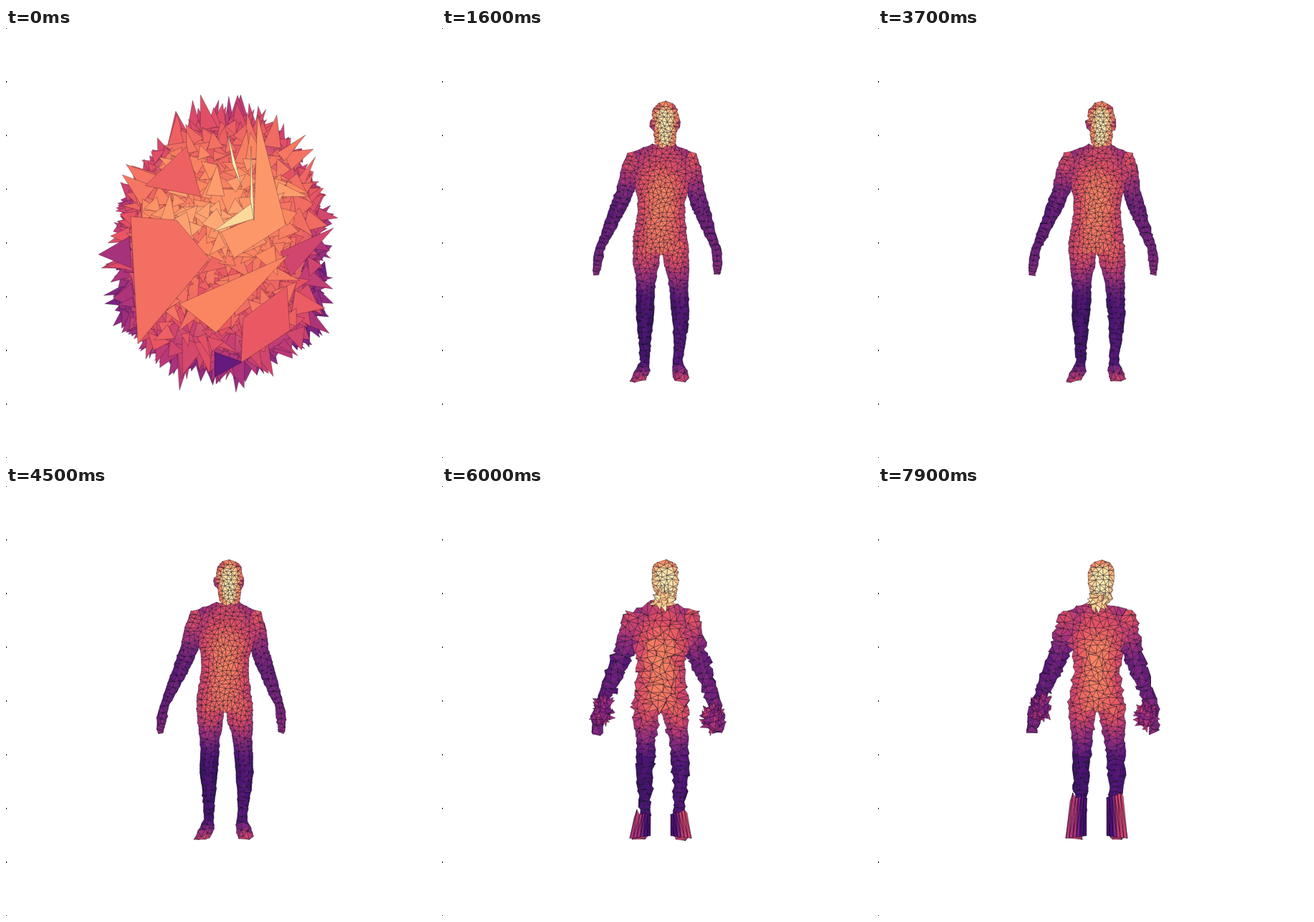
These frames come from a looping animation (600x600 px, 8 s). An HTML page with a canvas:

```html
<!DOCTYPE html>
<html lang="en">
<head>
<meta charset="utf-8">
<title>Mesh figure</title>
<style>
html, body { margin: 0; width: 100%; height: 100%; overflow: hidden; background: #fff; }
canvas { display: block; width: 600px; height: 600px; }
</style>
</head>
<body>
<canvas id="stage" width="600" height="600"></canvas>
<script>
const ctx = document.getElementById('stage').getContext('2d');
const LOOP = 8000, STEP = 100, COARSE_FROM = 4600;

// ---------- helpers ----------
const clamp = (v, lo = 0, hi = 1) => Math.min(hi, Math.max(lo, v));
const mix = (a, b, k) => a + (b - a) * k;
const ramp = (a, b, v) => { const k = clamp((v - a) / (b - a)); return k * k * (3 - 2 * k); };
const hash = n => { const s = Math.sin(n * 12.9898 + 4.1) * 43758.5453; return s - Math.floor(s); };
const signed = n => hash(n) * 2 - 1;

function drift(seed, s) {
  const i = Math.floor(s);
  return mix(signed(seed + i * 7.13), signed(seed + (i + 1) * 7.13), ramp(0, 1, s - i));
}

// Linear interpolation between key rows [y, ...values]; null outside them.
function between(keys, y) {
  const i = keys.findIndex((row, j) => j && y >= keys[j - 1][0] && y <= row[0]);
  if (i < 0) return null;
  const a = keys[i - 1], b = keys[i], k = (y - a[0]) / (b[0] - a[0]);
  return a.slice(1).map((v, j) => mix(v, b[j + 1], k));
}

const MAGMA = ['000004', '1d1147', '51127c', '822681', 'b73779', 'e75263', 'fc8961', 'fec488', 'fcfdbf']
  .map(h => [0, 2, 4].map(i => parseInt(h.slice(i, i + 2), 16)));

function color(v) {
  const p = clamp(v, 0, 0.9999) * 8, i = Math.floor(p);
  return `rgb(${MAGMA[i].map((c, j) => Math.round(mix(c, MAGMA[i + 1][j], p - i)))})`;
}

// ---------- body: key rows of y, (offset from the axis,) half width ----------
const TORSO = [[162, 14], [172, 38], [183, 50], [205, 43], [238, 33], [262, 33], [295, 38], [314, 38]];
const ARM = [[175, 42, 6], [195, 44, 11.5], [225, 48, 13], [250, 57, 12], [290, 73, 8], [308, 81, 6], [322, 83, 7], [345, 84.5, 4]];
const LEG = [[300, 19.5, 19.5], [330, 21, 17.5], [352, 22.5, 13.5], [400, 25, 12], [440, 24.2, 8], [466, 23, 6.5], [480, 26, 11], [494, 32, 10]];

const armAxis = y => 306.5 - (y - 180) * .04;
const legAxis = y => 304.5 + 3.5 * Math.sin(Math.PI * (y - 300) / 195);

function limb(keys, axis, side, tone, pad = 0) {
  return {
    from: keys[0][0], to: keys[keys.length - 1][0], drop: .1, power: 2, tone: y => tone(y) + side * .015,
    span: y => { const r = between(keys, y); return r && [axis(y) + side * r[0], r[1] + pad]; }
  };
}

function dome(cx, y0, y1, radius, neck, drop, power, tone) {
  const brow = y0 + radius;
  return {
    from: y0, to: y1, drop, power, tone,
    span: y => y < y0 || y > y1 ? null
      : [cx, y < brow ? Math.sqrt(radius ** 2 - (brow - y) ** 2) : mix(radius, neck, ramp(brow + 5, y1, y))]
  };
}

const armTone = y => .35 + .27 * (1 - ramp(178, 250, y)) + .06 * ramp(290, 345, y);
const legTone = y => .26 + .38 * (1 - ramp(308, 392, y)) + .32 * ramp(462, 494, y);
const torsoTone = y => .59 + .14 * ramp(172, 230, y) - .03 * ramp(250, 314, y);
const headTone = y => .76 + .2 * ramp(103, 122, y) - .1 * ramp(155, 166, y);

function figure(rough) {
  const parts = [
    dome(311.5, 103, 166, 18, 13.5, rough ? .2 : .3, rough ? 4 : 2, headTone),
    { from: 162, to: 314, drop: .19, power: 2, tone: torsoTone,
      span: y => { const r = between(TORSO, y); return r && [mix(308, 304.5, ramp(162, 314, y)), r[0]]; } }];
  for (const side of [-1, 1]) {
    parts.push(limb(ARM, armAxis, side, armTone, rough ? 2 : 0), limb(LEG, legAxis, side, legTone));
    if (!rough) parts.push(dome(311 + side * 17, 126, 142, 4, 2, .1, 2, () => .52));
  }
  return parts;
}

// Brightness at a point, or -1 outside the figure.
function toneAt(parts, x, y, inset = 0) {
  let best = -1;
  for (const p of parts) {
    const s = p.span(y);
    if (!s || Math.abs(x - s[0]) > s[1] - inset) continue;
    best = Math.max(best, p.tone(y) - p.drop * Math.abs((x - s[0]) / s[1]) ** p.power);
  }
  return best;
}

// ---------- mesh ----------
function scatter(parts, gap) {
  const pts = [];
  const add = (x, y, r) => {
    if (pts.every(p => (p.x - x) ** 2 + (p.y - y) ** 2 >= r * r)) pts.push({ x, y });
  };
  const rim = (x, y) => {
    if (toneAt(parts, x, y, 1) < 0) add(x + signed(x + y) * .3, y + signed(x * 3 + y) * .3, gap * .5);
  };
  for (const p of parts) {
    for (let y = p.from; y <= p.to; y += gap * .5) {
      const [c, w] = p.span(y);
      rim(c - w, y);
      rim(c + w, y);
    }
    for (const y of [p.from, p.to]) {
      const [c, w] = p.span(y);
      for (let x = c - w; x <= c + w; x += gap * .7) rim(x, y);
    }
  }
  for (let i = 0; i < 22000; i++) {
    const x = 210 + hash(i * 2 + .3) * 180, y = 103 + hash(i * 2 + 1.7) * 393;
    if (toneAt(parts, x, y, 1.2) >= 0) add(x, y, gap * (y < 166 ? .8 : 1));
  }
  return pts;
}

// Bowyer-Watson Delaunay triangulation.
function triangulate(pts) {
  const all = [...pts, { x: -3000, y: -2000 }, { x: 3600, y: -2000 }, { x: 300, y: 5000 }];
  const n = pts.length;
  const circle = v => {
    const [a, b, c] = v.map(i => all[i]);
    const bx = b.x - a.x, by = b.y - a.y, cx = c.x - a.x, cy = c.y - a.y;
    const d = 2 * (bx * cy - by * cx) || 1e-9, bb = bx * bx + by * by, cc = cx * cx + cy * cy;
    const ux = (cy * bb - by * cc) / d, uy = (bx * cc - cx * bb) / d;
    return { v, x: a.x + ux, y: a.y + uy, rr: ux * ux + uy * uy };
  };
  let tris = [circle([n, n + 1, n + 2])];
  pts.forEach((p, i) => {
    const edges = new Map(), keep = [];
    for (const t of tris) {
      if ((p.x - t.x) ** 2 + (p.y - t.y) ** 2 > t.rr) { keep.push(t); continue; }
      for (let j = 0; j < 3; j++) {
        const a = t.v[j], b = t.v[(j + 1) % 3], key = Math.min(a, b) * 10000 + Math.max(a, b);
        if (!edges.delete(key)) edges.set(key, [a, b]);
      }
    }
    for (const [a, b] of edges.values()) keep.push(circle([a, b, i]));
    tris = keep;
  });
  return tris.map(t => t.v).filter(v => Math.max(...v) < n);
}

function buildMesh(parts, gap) {
  const pts = scatter(parts, gap), faces = [];
  for (const v of triangulate(pts)) {
    const x = v.reduce((s, i) => s + pts[i].x, 0) / 3, y = v.reduce((s, i) => s + pts[i].y, 0) / 3;
    const tone = toneAt(parts, x, y);
    if (tone >= 0) faces.push({ v, tone: tone + signed(x * 1.7 + y) * .02 });
  }
  faces.sort((a, b) => a.tone - b.tone);
  return { pts, faces };
}

const fine = buildMesh(figure(false), 5.4);
const coarse = buildMesh(figure(true), 6.4);

// ---------- drawing ----------
function face(tone, ...xy) {
  ctx.beginPath();
  for (let i = 0; i < xy.length; i += 2) ctx.lineTo(xy[i], xy[i + 1]);
  ctx.closePath();
  ctx.fillStyle = color(tone);
  ctx.fill();
  ctx.stroke();
}

function drawMesh(mesh, amplitude, s) {
  const at = mesh.pts.map((p, i) => {
    const a = amplitude(p);
    return [p.x + a * drift(i * 2.3, s), p.y + a * drift(i * 2.3 + 900, s)];
  });
  for (const { v, tone } of mesh.faces) face(tone, ...at[v[0]], ...at[v[1]], ...at[v[2]]);
}

function spike(x, y, angle, length, half, tone) {
  const c = Math.cos(angle), s = Math.sin(angle);
  face(tone, x - s * half, y + c * half, x + s * half, y - c * half, x + c * length, y + s * length);
}

// A filled knot of spikes, from the rim inwards.
function burst(cx, cy, rx, ry, count, length, tone, seed, s) {
  ctx.beginPath();
  ctx.ellipse(cx, cy, rx, ry, 0, 0, 7);
  ctx.fillStyle = color(tone - .04);
  ctx.fill();
  for (let i = 0; i < count; i++) {
    const k = seed + i * 3.7, a = hash(k) * 6.283, r = Math.sqrt(1 - i / count);
    spike(cx + Math.cos(a) * rx * r, cy + Math.sin(a) * ry * r, a + drift(k + 1, s) * 1.1,
      length * (.5 + .6 * hash(k + 2)), 3 + 3 * hash(k + 3), tone + signed(k + 4) * .08);
  }
}

function boot(side, top, seed) {
  const n = 6, axis = 305;
  const upper = j => [axis + side * mix(14, 37, j / n), top + signed(seed + j) * 6];
  const lower = j => [axis + side * mix(14, 43, j / n), 488 + j * .6];
  for (let j = 0; j < n; j++) {
    const tone = mix(.22, .52 + side * .03, ramp(.1, .6, j / n));
    face(tone, ...upper(j), ...lower(j), ...lower(j + 1));
    face(tone + .03, ...upper(j), ...upper(j + 1), ...lower(j + 1));
  }
}

// ---------- opening cloud ----------
function cloudSpan(n) {
  return [298 - 14 * Math.min(0, n), 140 * Math.sqrt(1 - Math.abs(n) ** (n > 0 ? 4 : 2))];
}

const cloudSpikes = Array.from({ length: 720 }, (_, i) => {
  const k = i * 5.3, n = signed(k), outer = i % 3 === 0;
  const u = outer ? Math.sign(signed(k + 1)) * mix(.85, 1, hash(k + 6)) : signed(k + 1) * .92;
  const [c, w] = cloudSpan(n), x = c + u * w, y = 300 + n * 165;
  const rim = Math.max(Math.abs(u), Math.abs(n));
  const size = hash(k + 3) ** 2;
  return {
    x, y, size, outer,
    angle: Math.atan2(y - 300, x - 302) + signed(k + 2) * (rim > .8 ? .5 : 3),
    length: outer ? 12 + 18 * size : 18 + 32 * size,
    half: outer ? 5 + 8 * hash(k + 4) : 6 + 12 * hash(k + 4),
    tone: .76 - .09 * ramp(-.3, .3, n) - .23 * rim ** 4 - .08 * (outer ? ramp(-.6, .4, n) : 0) + signed(k + 5) * .06
  };
}).sort((a, b) => a.tone - b.tone);

// The few large faces that stand out: tone, then corners.
const shards = [
  [.3, 291, 487, 291, 452, 330, 466], [.46, 129, 316, 172, 291, 175, 335], [.57, 457, 279, 383, 312, 397, 347],
  [.66, 194, 220, 252, 165, 272, 235], [.64, 328, 467, 331, 405, 392, 360, 396, 422],
  [.69, 174, 263, 238, 268, 284, 322, 184, 441], [.74, 242, 385, 293, 425, 394, 317],
  [.78, 351, 122, 390, 275, 318, 321, 300, 285, 346, 265],
  [.92, 289, 284, 342, 245, 346, 266], [.97, 309, 145, 316, 190, 329, 222], [.97, 342, 165, 341, 240, 346, 268]];

function drawCloud() {
  const glow = ctx.createRadialGradient(305, 265, 40, 300, 300, 170);
  [.74, .68, .5].forEach((v, i) => glow.addColorStop(i / 2, color(v)));
  ctx.fillStyle = glow;
  ctx.beginPath();
  for (let a = 0; a < 6.28; a += .05) {
    const [c, w] = cloudSpan(Math.sin(a));
    ctx.lineTo(c + Math.sign(Math.cos(a)) * w, 300 + Math.sin(a) * 165);
  }
  ctx.fill();
  ctx.lineWidth = .35;
  for (const p of cloudSpikes) spike(p.x, p.y, p.angle, p.length, p.half, p.tone);
  for (const s of shards) face(...s);
}

// ---------- phases ----------
function drawFine(t) {
  const k = t / STEP, wild = 42 * Math.exp(-k * .85);
  drawMesh(fine, () => wild + 1, k * .7);
}

function drawCoarse(t) {
  const s = t / 800, calm = 1.2 * Math.exp(-(t - COARSE_FROM) / 3000);
  const g = clamp((t - 5200) / 1600), boots = ramp(5200, 5900, t);
  const rough = ({ x, y }) => {
    const skin = y < 150 ? 2 : y > 312 && Math.abs(x - 305) < 50 ? 3.2 : 5.5;
    return skin * calm + .5;
  };
  drawMesh(coarse, rough, s);
  for (const side of [-1, 1]) {
    const seed = 500 + side * 200;
    burst(301 + side * mix(79, 73, g), 323 + side * 6 - 7 * g, 11, 15, 46, mix(12, 10, g), .43 + side * .02, seed, s);
    if (boots) boot(side, mix(470, 445, g) - 11 * ramp(6800, 7900, t), seed);
    else burst(304.5 + side * 31, 478 + side * 2, 12, 9, 34, 8, .56 + side * .06, seed + 90, s);
  }
  burst(mix(311, 307, g), mix(154, 161, g), mix(13, 9, g), mix(11, 6, g), 30, 12, .9, 900, s);
}

function draw(t) {
  ctx.fillStyle = '#fff';
  ctx.fillRect(0, 0, 600, 600);
  ctx.fillStyle = '#000';
  for (let y = 0; y <= 600; y += 75) ctx.fillRect(0, y - 1, 1, 2);
  ctx.strokeStyle = 'rgba(12,4,24,.8)';
  ctx.lineJoin = 'bevel';
  ctx.lineWidth = .5;
  if (t < STEP) drawCloud();
  else if (t < COARSE_FROM) drawFine(t);
  else drawCoarse(t);
}

const start = performance.now();
let shown = -1;
function tick() {
  const step = Math.floor(((performance.now() - start) % LOOP) / STEP);
  if (step !== shown) draw((shown = step) * STEP);
  requestAnimationFrame(tick);
}
tick();
</script>
</body>
</html>
```
